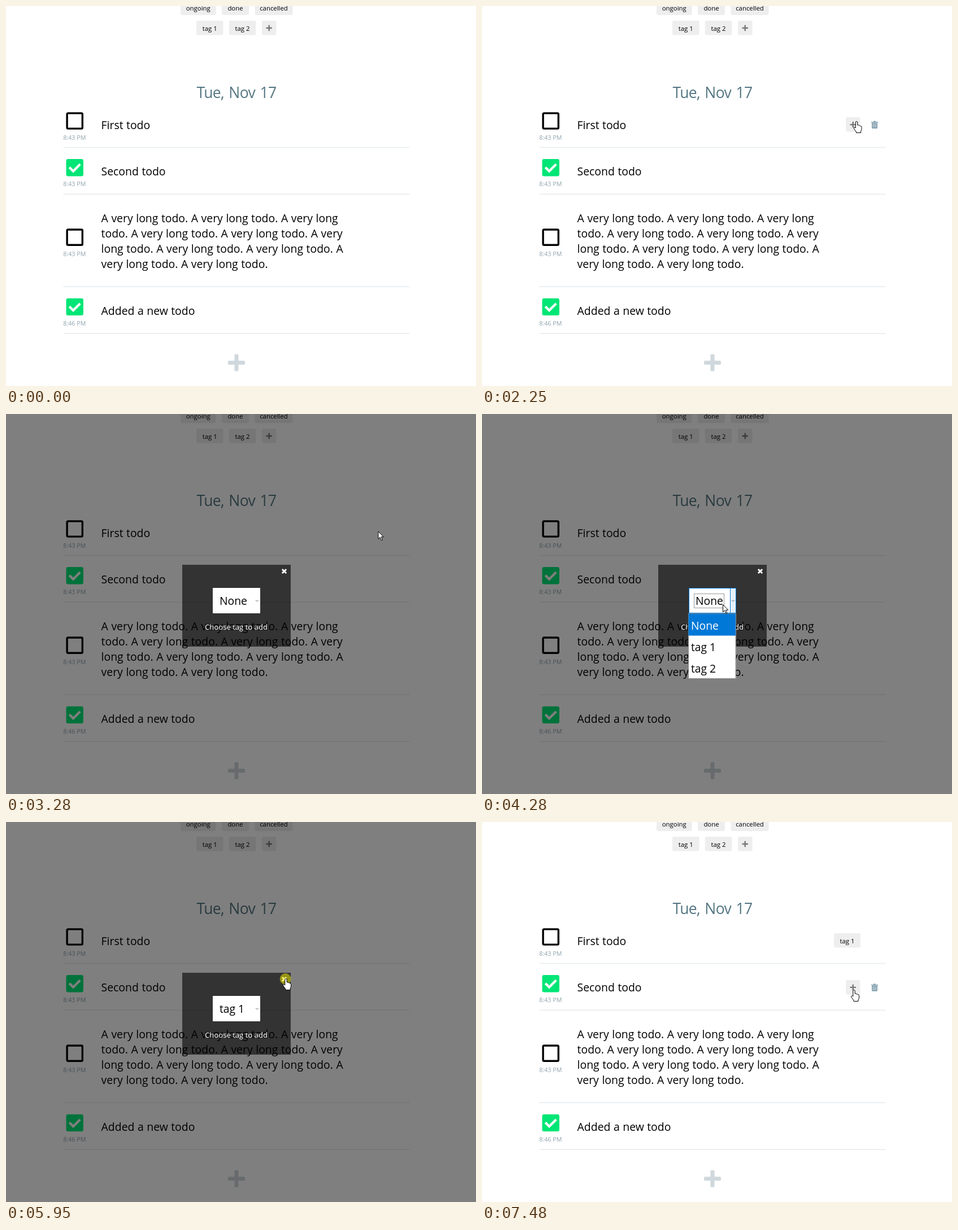
An HTML page with a canvas that plays this animation: 832x673 px, repeating every 8000 ms.

```html
<!DOCTYPE html>
<html lang="en">
<head>
<meta charset="utf-8">
<title>Todo list</title>
<style>
  html, body { margin: 0; width: 100%; height: 100%; overflow: hidden; background: #fff; }
  canvas { display: block; }
</style>
</head>
<body>
<canvas id="stage" width="832" height="673"></canvas>
<script>
const ctx = document.getElementById('stage').getContext('2d');
const LOOP = 8000;
const STEP = 75;
const SANS = '"Open Sans", "Noto Sans", sans-serif';
const BLUE = '#0078d7';
const LINE_HEIGHT = 27;

const TODOS = [
  { time: '8:43 PM', lines: ['First todo'] },
  { time: '8:43 PM', lines: ['Second todo'], done: true },
  { time: '8:43 PM', lines: [
    'A very long todo. A very long todo. A very long',
    'todo. A very long todo. A very long todo. A very',
    'long todo. A very long todo. A very long todo. A',
    'very long todo. A very long todo.'] },
  { time: '8:46 PM', lines: ['Added a new todo'], done: true }
];

let nextTop = 167.7;
for (const todo of TODOS) {
  const height = 55.8 + LINE_HEIGHT * todo.lines.length;
  todo.middle = nextTop + height / 2;
  todo.bottom = nextTop += height;
}
const addButtonY = todo => todo.middle + 1;

const CLOSE = { x: 492.5, y: 278.5 };
const START = { x: 794, y: 348 };
const GLIDES = [
  { start: 70, end: 220, x: 733, y: 216 },
  { start: 1460, end: 1980, x: 597, y: 228 },
  { start: 2060, end: 2250, x: 663, y: 205 },
  { start: 2420, end: 2650, x: 658.5, y: 207.5 },
  { start: 3660, end: 4125, x: 426, y: 337 },
  { start: 4430, end: 4660, x: 415, y: 415 },
  { start: 4960, end: 5400, x: 511, y: 284 },
  { start: 5470, end: 5770, x: 495.5, y: 278 },
  { start: 6270, end: 7000, x: 658, y: 303 },
  { start: 7170, end: 7480, x: 658.5, y: 298 }
];

const CLICK = { addTag: 2970, openSelect: 4125, pickTag: 4810, close: 5940 };
const PRESS = 80;
const MODAL_OPENS = 3280;
const MODAL_CLOSES = CLICK.close + PRESS;

const within = (t, a, b) => t >= a && t < b;
const smooth = u => u * u * (3 - 2 * u);

function pointerAt(t) {
  if (t < GLIDES[0].start) return null;
  let at = START;
  for (const glide of GLIDES) {
    if (t < glide.start) break;
    const steps = Math.round((glide.end - glide.start) / STEP) + 1;
    const step = Math.floor((t - glide.start) / (glide.end - glide.start) * (steps - 1)) + 1;
    const u = smooth(Math.min(1, step / steps));
    at = { x: at.x + (glide.x - at.x) * u, y: at.y + (glide.y - at.y) * u };
  }
  return at;
}

function rect(x, y, w, h, color) {
  ctx.fillStyle = color;
  ctx.fillRect(x, y, w, h);
}

function rounded(x, y, w, h, r, color) {
  ctx.fillStyle = color;
  ctx.beginPath();
  ctx.roundRect(x, y, w, h, r);
  ctx.fill();
}

function frame(x, y, w, h, color) {
  ctx.strokeStyle = color;
  ctx.lineWidth = 1;
  ctx.strokeRect(x + .5, y + .5, w - 1, h - 1);
}

function polyline(points, color, width) {
  ctx.strokeStyle = color;
  ctx.lineWidth = width;
  ctx.beginPath();
  points.forEach(p => ctx.lineTo(...p));
  ctx.stroke();
}

function label(text, x, y, size, { color = '#000', align = 'left', letter = 0, word = 0 } = {}) {
  ctx.font = `${size}px ${SANS}`;
  ctx.letterSpacing = letter + 'px';
  ctx.wordSpacing = word + 'px';
  ctx.textAlign = align;
  ctx.fillStyle = color;
  ctx.fillText(text, x, y);
}

function plus(x, y, size, weight, color) {
  const r = weight / 4;
  rounded(x - size / 2, y - weight / 2, size, weight, r, color);
  rounded(x - weight / 2, y - size / 2, weight, size, r, color);
}

function chip(x, y, w, text) {
  rounded(x, y, w, 25.5, 3, '#eee');
  if (text) label(text, x + w / 2, y + 17.5, 11.4, { align: 'center' });
  else plus(x + w / 2, y + 13, 10.5, 2.4, '#777');
}

function trash(x, y) {
  const color = '#84a0ae';
  rect(x - 6, y - 5, 12, 1.6, color);
  rect(x - 2, y - 6.5, 4, 1.5, color);
  rounded(x - 5, y - 2.8, 10, 9.6, [0, 0, 1.5, 1.5], color);
  [-2.7, 0, 2.7].forEach(dx => rect(x + dx - .4, y - 1.3, .8, 6.3, '#eef2f4'));
}

function checkbox(x, y, done) {
  if (done) {
    rounded(x - 15.2, y - 15.2, 30.4, 30.4, 3.3, '#00e676');
    polyline([[x - 9.5, y - .6], [x - 2.7, y + 6.2], [x + 9.5, y - 6]], '#fff', 4.2);
  } else {
    ctx.strokeStyle = '#000';
    ctx.lineWidth = 3.4;
    ctx.beginPath();
    ctx.roundRect(x - 13.6, y - 13.6, 27.2, 27.2, 1.8);
    ctx.stroke();
  }
}

function drawTodo({ middle, bottom, time, lines, done }) {
  checkbox(121.7, middle - 5.6, done);
  label(time, 121.3, middle + 27.5, 10.7, { color: '#90a4ae', align: 'center' });
  const baseline = middle + 8.5 - (lines.length - 1) * LINE_HEIGHT / 2;
  lines.forEach((text, i) =>
    label(text, 168.6, Math.round(baseline + i * LINE_HEIGHT), 19.4, { word: .5 }));
  rect(101.5, bottom - .8, 613, 1.6, '#e9edef');
}

function drawPage(hovered, pointer, tagged) {
  rect(0, 0, 832, 673, '#fff');
  chip(309, -9.5, 62.5, 'ongoing');
  chip(382, -9.5, 48, 'done');
  chip(440.5, -9.5, 67, 'cancelled');
  chip(337, 26, 47.5, 'tag 1');
  chip(394.8, 26, 47.5, 'tag 2');
  chip(453, 26, 25.5);
  label('Tue, Nov 17', 337.5, 163, 26.5, { color: '#547682', letter: -.65, word: 2.2 });

  TODOS.forEach(drawTodo);
  if (hovered) {
    const y = addButtonY(hovered);
    trash(695, y);
    if (within(pointer.x, 605, 685)) chip(644, y - 13, 25.5);
  }
  if (tagged) chip(623, addButtonY(TODOS[0]) - 13, 47, 'tag 1');
  plus(408, 631.7, 30, 7, '#cfd8dc');
}

function drawSelect(t, value, open, { x, y }) {
  const hot = open || (within(x, 366, 450) && within(y, 308, 353));
  rect(366, 308, 84, 45, '#fff');
  if (hot) {
    rect(439, 308, 11, 45, '#e5f1fb');
    frame(366, 308, 84, 45, BLUE);
    rect(439, 308, 1, 45, BLUE);
  }
  polyline([[442, 329.5], [444.5, 332], [447, 329.5]], '#666', 1);
  label(value, 378, 338.3, 19.3);
  if (within(t, CLICK.openSelect, CLICK.close)) {
    ctx.setLineDash([1, 1]);
    frame(375, 318, 54, 26, '#333');
    ctx.setLineDash([]);
  }
}

function drawDropdown(pointer) {
  const active = pointer.y > 392 ? 1 : 0;
  rect(365, 353, 84.5, 116, '#fff');
  frame(365, 353, 84.5, 116, '#8a8a8a');
  ['None', 'tag 1', 'tag 2'].forEach((text, i) => {
    const y = 354 + i * 38;
    if (i === active) rect(365.5, y, 83.5, 38.5, BLUE);
    label(text, 370, y + 27.5, 19.3, { color: i === active ? '#fff' : '#000' });
  });
}

function drawModal(t, pointer) {
  const picked = t >= CLICK.pickTag + PRESS;
  const open = t >= CLICK.openSelect + PRESS && !picked;
  rect(0, 0, 832, 673, 'rgba(0,0,0,.5)');
  rect(312, 267, 192, 145, 'rgba(0,0,0,.6)');
  for (const slope of [-3.6, 3.6]) {
    polyline([[CLOSE.x - 3.6, CLOSE.y - slope], [CLOSE.x + 3.6, CLOSE.y + slope]], '#fff', 2.8);
  }
  label('Choose tag to add', 407.5, 381.5, 13.1, { color: '#fff', align: 'center' });
  drawSelect(t, picked ? 'tag 1' : 'None', open, pointer);
  if (open) drawDropdown(pointer);
}

const ARROW = new Path2D('M.5 .5V13.8L3.6 10.9L6 16.4L8 15.5L5.7 10.2H9.8Z');
const HAND = new Path2D('M-1.7 11V1Q-1.7-.5 0-.5T1.7 1V6Q3.7 5.2 4.4 6.7Q6.2 6.2 6.8 7.7' +
  'Q9 7.2 9 9.5V13Q9 15 7.5 17V19.5H-.5V18L-4.7 12Q-5.5 10.2-4 9.7Q-3 9.6-1.7 11Z');

function drawPointer({ x, y }, kind) {
  ctx.save();
  ctx.translate(x, y);
  if (kind === 'text') {
    polyline([[1, -6], [1, 6]], '#000', 1.3);
    for (const end of [-6.5, 6.5]) polyline([[-2, end], [4, end]], '#000', 1.1);
  } else {
    const path = kind === 'hand' ? HAND : ARROW;
    ctx.fillStyle = '#fff';
    ctx.strokeStyle = '#000';
    ctx.lineWidth = 1;
    ctx.fill(path);
    ctx.stroke(path);
  }
  ctx.restore();
}

function pointerKind(t, { x, y }, modal, hovered) {
  if (modal) return Math.hypot(x - CLOSE.x, y - CLOSE.y) < 9 ? 'hand' : 'arrow';
  if (!hovered || within(t, MODAL_OPENS - PRESS, MODAL_OPENS)) return 'arrow';
  if (x < 603) return 'text';
  const onButton = within(x, 644, 670) && Math.abs(y - addButtonY(hovered)) < 13;
  return onButton ? 'hand' : 'arrow';
}

function drawClick({ x, y }) {
  ctx.fillStyle = 'rgba(240,235,0,.53)';
  ctx.beginPath();
  ctx.arc(x - .8, y, 10, 0, Math.PI * 2);
  ctx.fill();
}

function draw(t) {
  const pointer = pointerAt(t);
  const modal = within(t, MODAL_OPENS, MODAL_CLOSES);
  const inList = pointer && !modal && pointer.x < 714;
  const hovered = inList && TODOS.find(todo => pointer.y < todo.bottom);

  drawPage(hovered, pointer, t >= MODAL_CLOSES);
  if (!pointer) return;
  if (modal) drawModal(t, pointer);
  if (Object.values(CLICK).some(start => within(t, start, start + PRESS))) drawClick(pointer);
  drawPointer(pointer, pointerKind(t, pointer, modal, hovered));
}

const began = performance.now();
function tick() {
  draw((performance.now() - began) % LOOP);
  requestAnimationFrame(tick);
}
tick();
</script>
</body>
</html>
```
